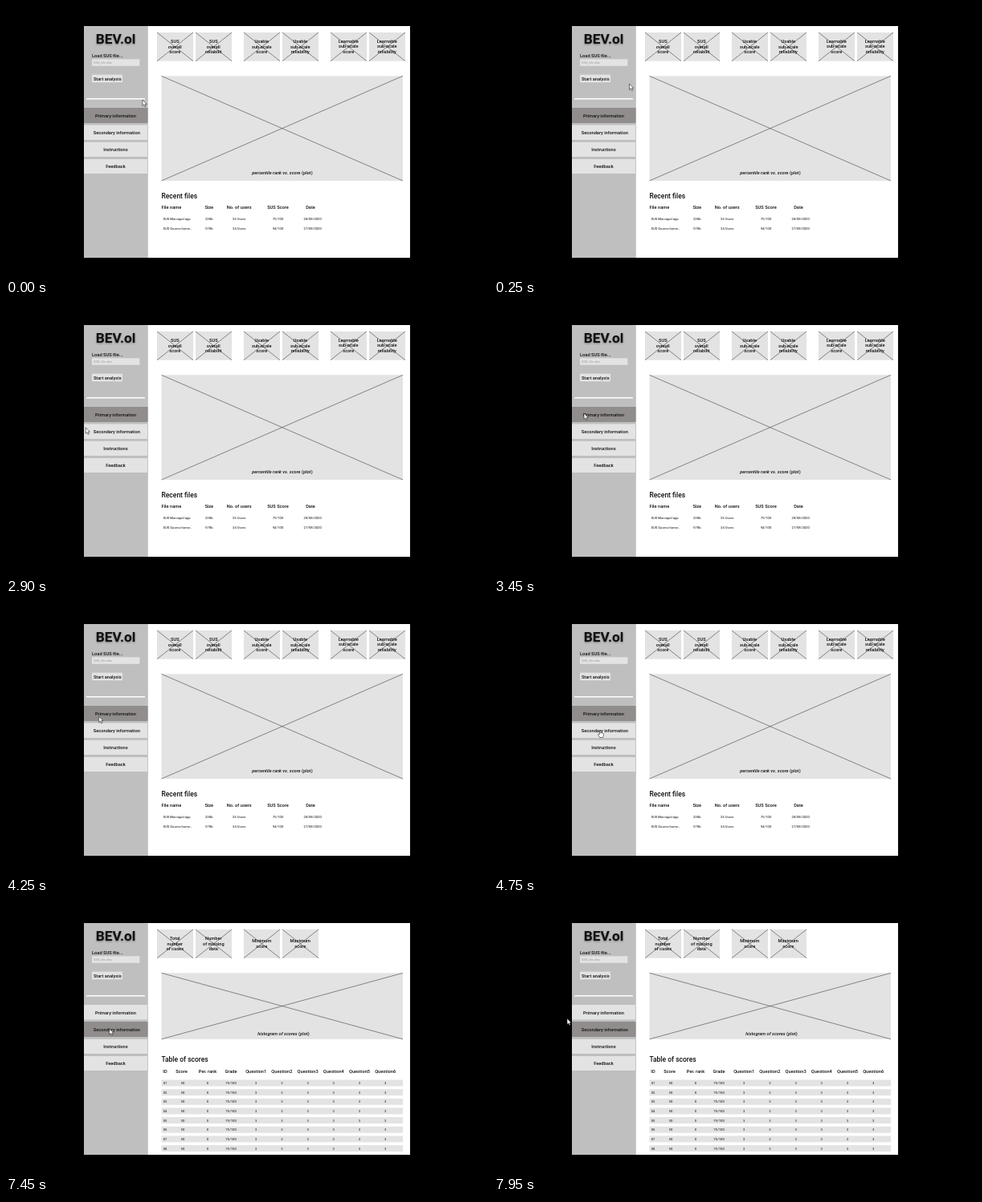
Write an HTML page that moves like this. It is 600 by 338 pixels and loops after 8 s.

```html
<!DOCTYPE html>
<html lang="en">
<head>
<meta charset="utf-8">
<title>Survey dashboard wireframe</title>
<style>
  html, body { margin: 0; width: 100%; height: 100%; overflow: hidden; background: #000; }
  svg { display: block; width: 100vw; height: 100vh; }
  text { font: 500 5.7px Roboto, Arial, sans-serif; fill: #111; white-space: pre; }
  .mid { text-anchor: middle; }
  .cell { font-size: 4.2px; font-weight: 400; }
  .head { font-size: 8.5px; }
  .logo { font-size: 17.3px; font-weight: 700; filter: drop-shadow(0 1px 1px #0006); }
  .hint { font-size: 4.2px; font-weight: 400; font-style: italic; fill: #999; }
  .raised { filter: drop-shadow(0 .5px .5px #0005); }
  .cross { stroke: #333; stroke-width: .55; fill: none; }
  .cursor path { fill: #fff; stroke: #111; stroke-width: .55; stroke-linejoin: round; }
</style>
</head>
<body>
<svg id="stage" viewBox="0 0 600 338"></svg>
<script>
const LIGHT = '#e3e3e3', ACTIVE = '#918d8d';

const rect = (x, y, w, h, fill = LIGHT, cls = '') =>
  `<rect x="${x}" y="${y}" width="${w}" height="${h}" fill="${fill}" class="${cls}"/>`;
const text = (x, y, s, cls = '') => `<text x="${x}" y="${y}" class="${cls}">${s}</text>`;
const mid = (x, y, s, cls = '') => text(x, y, s, 'mid ' + cls);

const crossed = (x, y, w, h) => rect(x, y, w, h) +
  `<path class="cross" d="M${x} ${y}l${w} ${h}m0 ${-h}l${-w} ${h}"/>`;

// A placeholder tile with its lines of text centred on it
const tile = (label, x, shift = 0) => {
  const lines = label.split('|');
  return crossed(x, 33, 45, 35.7) + lines.map((s, i) =>
    mid(x + 22.3, 52.5 + shift + (i - (lines.length - 1) / 2) * 6.5, s)).join('');
};

const tileX = [188, 236, 296, 344, 404, 452];
const tiles = labels => labels.map((s, i) => tile(s, tileX[i], i > 3 ? -.5 : 0)).join('');

const plot = (h, name, x, y) => crossed(193.5, 87.3, 300.5, h) +
  mid(x, y, `<tspan font-style="italic">${name}</tspan> (plot)`);

const menu = active => ['Primary', 'Secondary', 'Instructions', 'Feedback'].map((s, i) =>
  rect(97, 127 + i * 21.2, 79.3, 18.8, i == active ? ACTIVE : LIGHT, 'raised') +
  mid(i == 1 ? 137.8 : 136.5, 138.5 + i * 21.2, i < 2 ? s + ' information' : s)).join('');

const frame = rect(97, 25, 406, 289, '#fff') + rect(97, 25, 79.8, 289, '#bfbfbf') +
  mid(136.5, 46.8, 'BEV.ol', 'logo') +
  text(107, 63.7, 'Load SUS file...') +
  rect(107, 66.3, 59.3, 8.5) + text(109, 72, 'SUS_file.xlsx', 'hint') +
  rect(107, 85.3, 38.5, 10.4, LIGHT, 'raised') + mid(126.3, 92.6, 'Start analysis') +
  rect(100, 115, 73, 1.7, '#fff', 'raised');

function primaryPage() {
  const cols = [252.8, 290.3, 338.5, 379];
  const files = [
    ['SUS Morvapal app', '23Kb', '26 Users', '75/100', '28/08/2020'],
    ['SUS Quarvo home...', '57Kb', '34 Users', '94/100', '27/08/2020']
  ];
  return menu(0) +
    tiles(['SUS|overall|score', 'SUS|overall|reliabilit', 'Usable|sub-scale|score',
      'Usable|sub-scale|reliability', 'Learnable|sub-scale|score', 'Learnable|sub-scale|reliability']) +
    plot(130.7, 'percentile rank vs. score', 344, 209.5) +
    text(193.5, 240, 'Recent files', 'head') + text(193.5, 253.2, 'File name') +
    ['Size', 'No. of users', 'SUS Score', 'Date'].map((s, i) => mid(cols[i], 253.2, s)).join('') +
    files.map(([name, ...rest], r) => {
      const y = 266.8 + r * 11.9;
      return text(195.5, y, name, 'cell') +
        rest.map((s, i) => mid(cols[i] + (i == 3 ? 2.7 : 0), y, s, 'cell')).join('');
    }).join('');
}

function secondaryPage() {
  const cols = [198, 218.5, 251, 280];
  const heads = ['ID', 'Score', 'Per. rank', 'Grade'];
  for (let q = 1; q < 7; q++) {
    cols.push(279 + q * 32.2);
    heads.push('Question' + q);
  }
  let rows = '';
  for (let r = 0; r < 8; r++) {
    const y = 224.5 + r * 11.65;
    rows += rect(193.5, y - 4, 300.5, 8) +
      ['0' + (r + 1), 50, 0, '75/100', 3, 3, 3, 3, 3, 3].map((s, i) =>
        mid(cols[i] + (i == 1 ? 1.5 : 0), y + 1.5, s, 'cell')).join('');
  }
  return menu(1) +
    tiles(['Total|number|of cases', 'Number|of missing|data', 'Minimum|score', 'Maximum|score']) +
    plot(82.5, 'histogram of scores', 345.5, 164.7) +
    text(193.5, 198.3, 'Table of scores', 'head') +
    heads.map((s, i) => mid(cols[i], 211.8, s)).join('') + rows;
}

stage.innerHTML = frame +
  `<g id="primary">${primaryPage()}</g><g id="secondary">${secondaryPage()}</g>
  <g id="cursor" class="cursor">
    <path id="arrow" d="M0 0V7.4L1.7 5.9 2.9 8.6 4.2 8 3 5.4H5.2Z"/>
    <path id="hand" d="M.4 5.2V.8Q1 -.2 1.7 .8V3.3Q2.4 2.7 2.9 3.5 3.6 3 4.1 3.8 5.2 3.4 5.4 4.6V6.6L4.6 9H.7L-1.3 5.8Q-1.4 4.5 -.4 4.8Z"/>
  </g>`;

// Pointer strokes: start and end in ms, then the curve's points
const line = (a, b) => [a, a, b, b];
const strokes = [
  [100, 250, line([170, 117], [168.5, 97])],
  [1750, 1750, line([168.5, 97], [109, 159])],
  [2800, 3450, [[109, 159], [84, 150], [92, 116], [112, 135]]],
  [4100, 4750, [[112, 135], [115, 141], [128, 153], [131, 157.5]]],
  [7450, 7950, [[131, 157.5], [118, 153], [104, 148], [91, 144]]]
];

function pointer(t) {
  const [start, end, pts] = strokes.filter((s, i) => !i || t >= s[0]).pop();
  const p = Math.max(0, Math.min(1, (t - start + 50) / (end - start + 50)));
  const k = t < start ? 0 : (p + p * p * (3 - 2 * p)) / 2;
  const w = [(1 - k) ** 3, 3 * k * (1 - k) ** 2, 3 * k * k * (1 - k), k ** 3];
  return [0, 1].map(axis => pts.reduce((sum, pt, i) => sum + pt[axis] * w[i], 0));
}

const show = (el, on) => el.setAttribute('visibility', on ? 'visible' : 'hidden');

function draw(now) {
  const t = Math.floor(now % 8000 / 50) * 50;
  const [x, y] = pointer(t);
  const linked = t >= 4100 && t < 5500 && y > 148;
  show(primary, t < 5450);
  show(secondary, t >= 5450);
  show(arrow, !linked);
  show(hand, linked);
  cursor.setAttribute('transform', `translate(${x} ${y})`);
  requestAnimationFrame(tick);
}

const begin = performance.now();
const tick = () => draw(performance.now() - begin);
tick();
</script>
</body>
</html>
```
